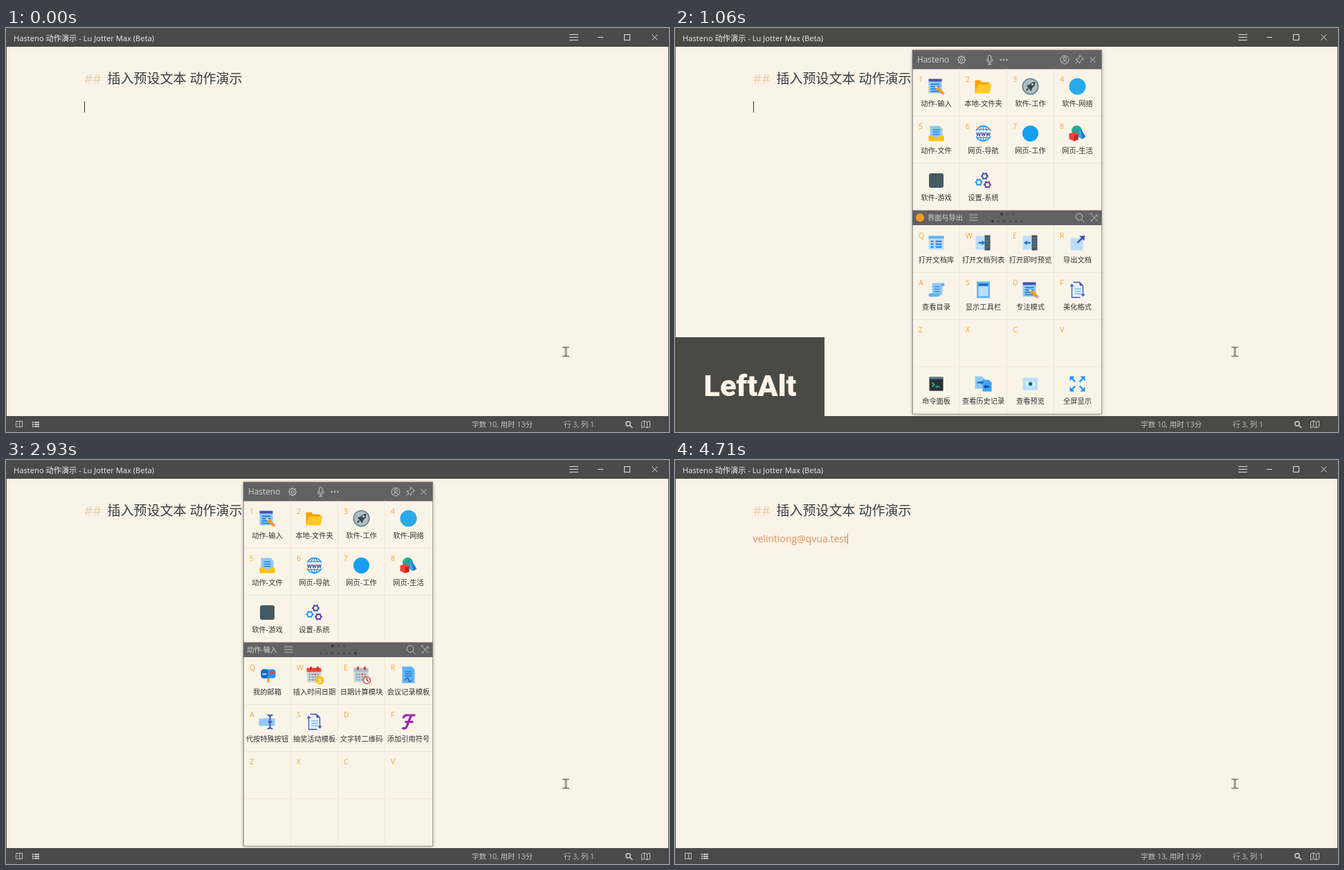
An HTML page with a canvas that plays this animation: 958x584 px, repeating every 4860 ms.

```html
<!DOCTYPE html>
<html lang="zh-CN">
<head>
<meta charset="utf-8">
<title>动作演示</title>
<style>
  html, body { margin: 0; width: 100%; height: 100%; overflow: hidden; background: #faf3e7; }
  canvas { display: block; }
</style>
</head>
<body>
<canvas id="stage" width="958" height="584"></canvas>
<script>
const ctx = document.getElementById('stage').getContext('2d');
const LOOP = 4860;
const UI = '"Open Sans", "Noto Sans CJK SC", "Noto Sans CJK", sans-serif';
const PAPER = '#faf3e7', NAVY = '#3f51b5', BLUE = '#2196f3', SKY = '#90caf9', PALE = '#bbdefb',
  SLATE = '#455a64', AMBER = '#ffc107', ORANGE = '#f5a33c', RED = '#f44336';

// Drawing helpers
function rect(color, x, y, w, h, r = 0) {
  ctx.fillStyle = color;
  ctx.beginPath();
  ctx.roundRect(x, y, w, h, r);
  ctx.fill();
}
function trace(points) {
  ctx.beginPath();
  for (let i = 0; i < points.length; i += 2) ctx.lineTo(points[i], points[i + 1]);
}
function poly(color, ...points) {
  ctx.fillStyle = color;
  trace(points);
  ctx.fill();
}
function line(color, width, ...points) {
  ctx.strokeStyle = color;
  ctx.lineWidth = width;
  trace(points);
  ctx.stroke();
}
function box(color, width, x, y, w, h) {
  ctx.strokeStyle = color;
  ctx.lineWidth = width;
  ctx.strokeRect(x, y, w, h);
}
function disc(color, x, y, r) {
  ctx.fillStyle = color;
  ctx.beginPath();
  ctx.arc(x, y, r, 0, 7);
  ctx.fill();
}
function ring(color, width, x, y, rx, ry = rx) {
  ctx.strokeStyle = color;
  ctx.lineWidth = width;
  ctx.beginPath();
  ctx.ellipse(x, y, rx, ry, 0, 0, 7);
  ctx.stroke();
}
function path(color, width, d) {
  ctx.strokeStyle = color;
  ctx.lineWidth = width;
  ctx.stroke(new Path2D(d));
}
function text(str, x, y, size, color, align = 'left', font = UI, weight = 400) {
  ctx.font = `${weight} ${size}px ${font}`;
  ctx.fillStyle = color;
  ctx.textAlign = align;
  ctx.fillText(str, x, y);
}
function rows(color, x, y, w, count, gap, h = 1.3) {
  for (let i = 0; i < count; i++) rect(color, x, y + i * gap, w, h);
}
function gear(color, x, y, r, width, teeth) {
  ring(color, width, x, y, r);
  for (let i = 0; i < teeth; i++) {
    const a = i * 2 * Math.PI / teeth, c = Math.cos(a), s = Math.sin(a);
    line(color, width, x + c * r, y + s * r, x + c * (r + 1.8), y + s * (r + 1.8));
  }
}
function arrow(color, x, y, angle, length, head = 4) {
  ctx.save();
  ctx.translate(x, y);
  ctx.rotate(angle);
  rect(color, -length, -1.2, length, 2.4);
  poly(color, -1, -head, head, 0, -1, head);
  ctx.restore();
}
function cross(color, x, y, r) {
  line(color, 1, x - r, y - r, x + r, y + r);
  line(color, 1, x - r, y + r, x + r, y - r);
}
function magnifier(color, x, y, r, width) {
  ring(color, width, x - 1, y - 1, r);
  line(color, width, x + r * 0.6, y + r * 0.6, x + r + 2, y + r + 2);
}
function calendar(header) {
  rect('#cfd8dc', -11, -10, 21, 21, 1.5);
  rect(header, -11, -10, 21, 6, 1.5);
  for (const x of [-6, 4]) rect('#b71c1c', x, -12, 2, 5);
  for (let i = 0; i < 12; i++) {
    rect(i % 5 == 2 ? RED : '#90a4ae', -8 + i % 4 * 4, -2 + Math.floor(i / 4) * 4, 2.6, 2.6);
  }
}
function sidePane(angle) {
  rect(PALE, -11, -10, 15, 20);
  rect(SLATE, 2, -11, 8, 22);
  rows('#78909c', 4, -7, 4, 4, 4, 1);
  arrow('#1976d2', angle ? -6 : -1, 0, angle, 6, 3.5);
}
function sheet(color, x, y, w, h) {
  poly(color, x, y, x + w - 4, y, x + w, y + 4, x + w, y + h, x, y + h);
}

// Each icon is drawn around its own centre
const icons = {
  compose() {
    rect(SKY, -11, -7, 19, 17);
    rect(NAVY, -11, -11, 19, 4);
    rows('#1976d2', -8, -4, 13, 4, 3.4, 1.6);
    line('#ff9800', 4, 1, 2, 9, 9.5);
    line('#f48fb1', 4, 9, 9.5, 11, 11.3);
    poly('#ffe0b2', -2, -1, 2.4, .5, -.4, 3.3);
  },
  folder() {
    poly('#ffa000', -12, -9, -4, -9, -2, -6, 9, -6, 9, 9, -12, 9);
    poly('#ffca28', -8, -3, 12, -3, 9, 10, -12, 10);
  },
  rocket() {
    disc('#607d8b', 0, 0, 12);
    disc('#b0bec5', 0, 0, 10.5);
    poly('#37474f', 7, -7, 6, -1, 0, 5, -4, 1, 1, -5);
    poly('#37474f', -1, -3, -6, -1, -3, 1);
    poly('#37474f', 3, 1, 1, 7, -1, 4);
    line('#37474f', 2, -6, 6, -3, 3);
    disc('#eceff1', 3, -3, 1.5);
  },
  chat() { disc('#29a9ea', 0, 0, 12); },
  tray() {
    sheet(SKY, -9, -11, 18, 17);
    rows('#1976d2', -5, -6, 10, 3, 3.3);
    poly(AMBER, -11, 3, -5, 3, -3, 6, 3, 6, 5, 3, 11, 3, 11, 11, -11, 11);
  },
  globe() {
    ring(BLUE, 1.4, 0, 0, 11);
    ring(BLUE, 1.2, 0, 0, 5.5, 11);
    line(BLUE, 1.2, 0, -11, 0, 11);
    for (const y of [-6, 6]) line(BLUE, 1.2, -9, y, 9, y);
    rect(PAPER, -12, -4, 24, 8);
    text('WWW', 0, 3, 8, NAVY, 'center', 'Roboto, sans-serif', 900);
  },
  call() { disc('#159fee', 0, 0, 11.5); },
  solids() {
    disc('#26a69a', -1, -4, 7.5);
    poly('#1976d2', 4, -8, 12, 5, 7, 8, 1, 5);
    poly('#42a5f5', 4, -8, 1, 5, 7, 8);
    poly('#f44336', -12, 0, -4, -2, 1, 1, 1, 9, -5, 11, -12, 8);
    poly('#c62828', -5, 3, 1, 1, 1, 9, -5, 11);
  },
  game() { rect(SLATE, -10.5, -10.5, 21, 21, 3); },
  gears() {
    gear(NAVY, 2, -6.5, 3.6, 2, 6);
    gear(BLUE, -6.5, 2.5, 3.6, 2, 6);
    gear('#673ab7', 6, 6, 3.6, 2, 6);
  },
  library() {
    rect(PALE, -11, -10, 22, 20);
    rect('#64b5f6', -11, -10, 22, 4);
    rows('#1976d2', -8, -3, 4, 3, 4, 2);
    rows('#1976d2', -1, -3, 9, 3, 4, 2);
  },
  listPane() { sidePane(0); },
  preview() { sidePane(Math.PI); },
  share() {
    rect(PALE, -10, -7, 18, 18);
    arrow(NAVY, 7, -7, -Math.PI / 4, 10, 5);
  },
  scroll() {
    rect(SKY, -6, -10, 15, 18, 2);
    rect('#64b5f6', 7, -10, 5, 5, 2);
    rect('#64b5f6', -11, 5, 16, 5, 2);
    rows('#1976d2', -3, -5, 8, 3, 3.5, 1);
  },
  toolbar() {
    rect('#64b5f6', -9.5, -12, 19, 24);
    rect(PALE, -7, -5, 14, 14);
    rect('#1565c0', -7, -9, 14, 3);
  },
  pageCycle() {
    sheet('#e3f2fd', -7, -11, 15, 22);
    line(NAVY, 1.3, -8, -5, -8, 11, 4, 11);
    line(NAVY, 1.3, -6, -11, 3, -11, 8, -6, 8, 7);
    poly(NAVY, -11, -5, -8, -9, -5, -5);
    poly(NAVY, 5, 6, 11, 6, 8, 10);
    poly(NAVY, 3, -11, 8, -6, 3, -6);
    rows('#64b5f6', -4, -2, 9, 3, 3.5);
  },
  terminal() {
    rect('#263238', -10, -10, 20, 20, 1);
    rect('#607d8b', -10, -10, 20, 3);
    line('#26d6b0', 1.5, -6, -2, -3, 1, -6, 4);
    line('#26d6b0', 1.5, -1, 4, 5, 4);
  },
  history() {
    sheet(SKY, -12, -11, 14, 18);
    sheet('#42a5f5', -1, -6, 13, 17);
    arrow('#1565c0', -2, -2, 0, 7, 3);
    arrow('#0d47a1', 3, 4, Math.PI, 6, 3);
  },
  eye() {
    rect(PALE, -11, -9, 22, 18);
    ctx.fillStyle = '#fff';
    ctx.fill(new Path2D('M-7 0Q0-8 7 0Q0 8-7 0'));
    disc('#26a69a', 0, 0, 3.2);
    disc('#263238', 0, 0, 1.5);
  },
  expand() {
    for (let i = 0; i < 4; i++) {
      ctx.rotate(Math.PI / 2);
      poly(BLUE, 4, -11, 11, -11, 11, -4);
      line(BLUE, 2.4, 3, -3, 9, -9);
    }
  },
  mailbox() {
    rect('#ff9800', 0, 4, 3, 7);
    rect(BLUE, -9, -8, 21, 13, 4);
    rect('#1565c0', -9, -8, 10, 13, 4);
    rect(PALE, -7, -2, 6, 2);
    rect(RED, 4, -5, 7, 3);
    rect(RED, 4, -5, 2, 6);
  },
  dateCoin() {
    calendar(RED);
    disc(AMBER, 8, 8, 6);
    text('5', 8, 11.5, 9, '#fff', 'center', UI, 700);
  },
  dateClock() {
    calendar('#b0bec5');
    disc('#fff', 8, 8, 5);
    ring(RED, 1.6, 8, 8, 5);
    line('#263238', 1.2, 8, 4.5, 8, 8, 10.5, 9.5);
  },
  minutes() {
    sheet('#64b5f6', -9, -12, 18, 24);
    rows('#1976d2', -5, -5, 10, 3, 3);
    path('#0d47a1', 1.2, 'M-5 8Q-1 1 0 7T5 7');
  },
  textField() {
    rect(SKY, -12, -5, 23, 11);
    path(NAVY, 2, 'M0-10Q4-10 4-7V7Q4 10 0 10M8-10Q4-10 4-7M4 7Q4 10 8 10M1 0H7');
  },
  blank() {},
  script() {
    path('#9c27b0', 3.2, 'M-7-5Q-7-10-1-9.5H10M4-9Q0 0-2 6Q-4 11-9 9M-5 0H7');
  }
};

const topCells = [
  ['compose', '动作-输入'], ['folder', '本地-文件夹'], ['rocket', '软件-工作'], ['chat', '软件-网络'],
  ['tray', '动作-文件'], ['globe', '网页-导航'], ['call', '网页-工作'], ['solids', '网页-生活'],
  ['game', '软件-游戏'], ['gears', '设置-系统']
];
const appCells = [
  ['library', '打开文档库'], ['listPane', '打开文档列表'], ['preview', '打开即时预览'], ['share', '导出文档'],
  ['scroll', '查看目录'], ['toolbar', '显示工具栏'], ['compose', '专注模式'], ['pageCycle', '美化格式'],
  , , , ,
  ['terminal', '命令面板'], ['history', '查看历史记录'], ['eye', '查看预览'], ['expand', '全屏显示']
];
const inputCells = [
  ['mailbox', '我的邮箱'], ['dateCoin', '插入时间日期'], ['dateClock', '日期计算模块'], ['minutes', '会议记录模板'],
  ['textField', '代按特殊按钮'], ['pageCycle', '抽奖活动模板'], ['blank', '文字转二维码'], ['script', '添加引用符号']
];

function drawCells(cells, keys, top, rowCount) {
  for (let i = 1; i < 4; i++) rect('#efe8da', 343 + i * 68, top, 1, rowCount * 68);
  for (let i = 1; i < rowCount; i++) rect('#efe8da', 344, top + i * 68, 272, 1);
  for (let i = 0; i < rowCount * 4; i++) {
    const x = 343.5 + i % 4 * 68, y = top + Math.floor(i / 4) * 68;
    if (keys[i]) text(keys[i], x + 8.5, y + 19, 10.5, ORANGE);
    if (!cells[i]) continue;
    ctx.save();
    ctx.translate(x + 34, y + 25.5);
    icons[cells[i][0]]();
    ctx.restore();
    text(cells[i][1], x + 34, y + 53.5, 10.25, '#333', 'center');
  }
}

function drawPanel(inputPage) {
  const soft = '#c8c8c8', dot = '#4e5156', activeDot = '#2f3440';
  ctx.save();
  ctx.shadowColor = 'rgba(0,0,0,.4)';
  ctx.shadowBlur = 5;
  rect('#a19e97', 342.5, 31.5, 274.5, 527);
  ctx.restore();
  rect('#faf4e8', 344, 32, 272, 525.5);
  rect('#626262', 343, 32, 273.5, 27.5);
  rect('#626262', 343, 263.5, 273.5, 21.5);

  text('Hasteno', 350, 50, 11.8, '#d6d6d6');
  gear(soft, 414, 46, 4.6, 1.1, 8);
  ring(soft, 1, 414, 46, 2);
  ctx.strokeStyle = soft;
  ctx.beginPath();
  ctx.roundRect(452.5, 39.5, 4.5, 8.5, 2.2);
  ctx.stroke();
  path(soft, 1, 'M450.5 45Q450.5 50 454.7 50T459 45M454.7 50V52.5M452 52.5H457.5');
  for (let i = 0; i < 3; i++) disc(soft, 470.5 + i * 4.5, 46, 1.2);
  ring(soft, 1, 563, 46, 6);
  ring(soft, 1, 563, 44, 2.2);
  path(soft, 1, 'M559 50Q563 45 567 50');
  path(soft, 1, 'M585 39.5L590.5 45L588 45.5L585.5 48L585 51L579 45L582 44.5L584.5 42ZM582 48L578 52');
  cross(soft, 603.5, 46, 4);
  drawCells(topCells, '12345678', 59, 3);

  const menuX = inputPage ? 402 : 425;
  if (!inputPage) disc('#f59a23', 354, 274, 6);
  text(inputPage ? '动作-输入' : '界面与导出', inputPage ? 348 : 365, 278, 10.2, '#d6d6d6');
  for (const y of [270, 274, 278]) rect('#bdbdbd', menuX, y - .5, 12.5, 1);
  for (let i = 0; i < 3; i++) disc(i ? dot : activeDot, 472 + i * 8.4, 269, 1.9);
  const count = inputPage ? 7 : 6, active = inputPage ? 6 : 0;
  for (let i = 0; i < count; i++) {
    disc(i == active ? activeDot : dot, (inputPage ? 454.5 : 459) + i * 8.45, 279.3, 1.9);
  }
  magnifier(soft, 585, 274, 4.8, 1);
  path(soft, 0.9, 'M601.5 270L611 279.5M610.5 269L601 279.5M600 270Q600 267 603 268M608 270Q609 274 612 271M600 277L603 280');
  drawCells(inputPage ? inputCells : appCells, 'QWERASDFZXCV', 285, 4);
}

function drawWindow(bar, edge, words) {
  const light = '#e4e4e4', dim = '#c3c3c3';
  rect(PAPER, 0, 0, 958, 584);
  rect(bar, 0, 0, 958, 27);
  rect('#3b3b39', 0, 26, 958, 1);
  rect(bar, 0, 561, 958, 23);
  rect(edge, 0, 27, 1, 534);
  rect(edge, 957, 27, 1, 534);
  text('Hasteno 动作演示 - Lu Jotter Max (Beta)', 11, 18.5, 11.2, '#efefef');
  for (const y of [9, 13, 17]) rect(light, 814, y, 13, 1);
  rect(light, 855, 13, 8, 1);
  box(light, 1, 893.5, 9.5, 8, 8);
  cross(light, 937.5, 13.5, 4);

  text('##', 113, 79.5, 19, '#e6cfae');
  text('插入预设文本 动作演示', 146.5, 79.5, 19, '#3a3d40');

  box(dim, 1, 14.5, 568.5, 9, 8);
  rect(dim, 19, 569, 1, 8);
  for (let y = 569; y < 577; y += 3) {
    rect(dim, 38, y, 2, 2);
    rect(dim, 41, y, 7, 2);
  }
  text(`字数 ${words}, 用时 13分`, 673, 577, 10.6, dim);
  text('行 3, 列 1', 806, 577, 10.6, dim);
  magnifier(dim, 900, 573, 3.2, 1.7);
  path(dim, 1, 'M918.5 569.5L922.5 568L926.5 569.5L930.5 568V576.5L926.5 578L922.5 576.5L918.5 578ZM922.5 568V576.5M926.5 569.5V578');
}

function drawPointer() {
  path('#777', 1.6, 'M804 461.5H814M804 474.5H814');
  line('#777', 3, 809, 461, 809, 475);
  line('#ded8ce', 1, 809, 463, 809, 473);
}

function drawKey(label, width) {
  rect('#4a4a44', 0, 447, width, 137);
  text(label, 41.5, 531.5, 43.3, '#fdf5e9', 'left', 'Roboto, sans-serif', 900);
}

const within = (t, from, to) => t >= from && t < to;

function draw(t) {
  const key = within(t, 830, 1700) ? ['LeftAlt', 216]
    : within(t, 2160, 2790) ? ['1', 100]
    : within(t, 3390, 4010) ? ['q None', 224] : null;
  const typing = within(t, 3390, 3470), done = t >= 3470;
  const caretOff = within(t, 450, 990) || within(t, 1700, 2160) || within(t, 2930, 3390) || within(t, 4160, 4710);

  drawWindow(key ? '#4a4a45' : '#4a4a4a', key ? '#6e6e68' : '#4a4a4a', done ? 13 : typing ? 11 : 10);
  if (typing) text('ve', 112.5, 119, 14, '#3a3d40');
  if (done) text('velintiong@qvua.test', 112.5, 119, 14, '#e0925f');
  if (!caretOff) rect(done ? '#b98a6c' : '#333', done ? 249 : typing ? 127 : 113, 106, 1, 16);
  if (within(t, 990, 3390)) drawPanel(t >= 2230);
  if (key) drawKey(...key);
  drawPointer();
}

function tick() {
  draw(performance.now() % LOOP);
  requestAnimationFrame(tick);
}
tick();
</script>
</body>
</html>
```
